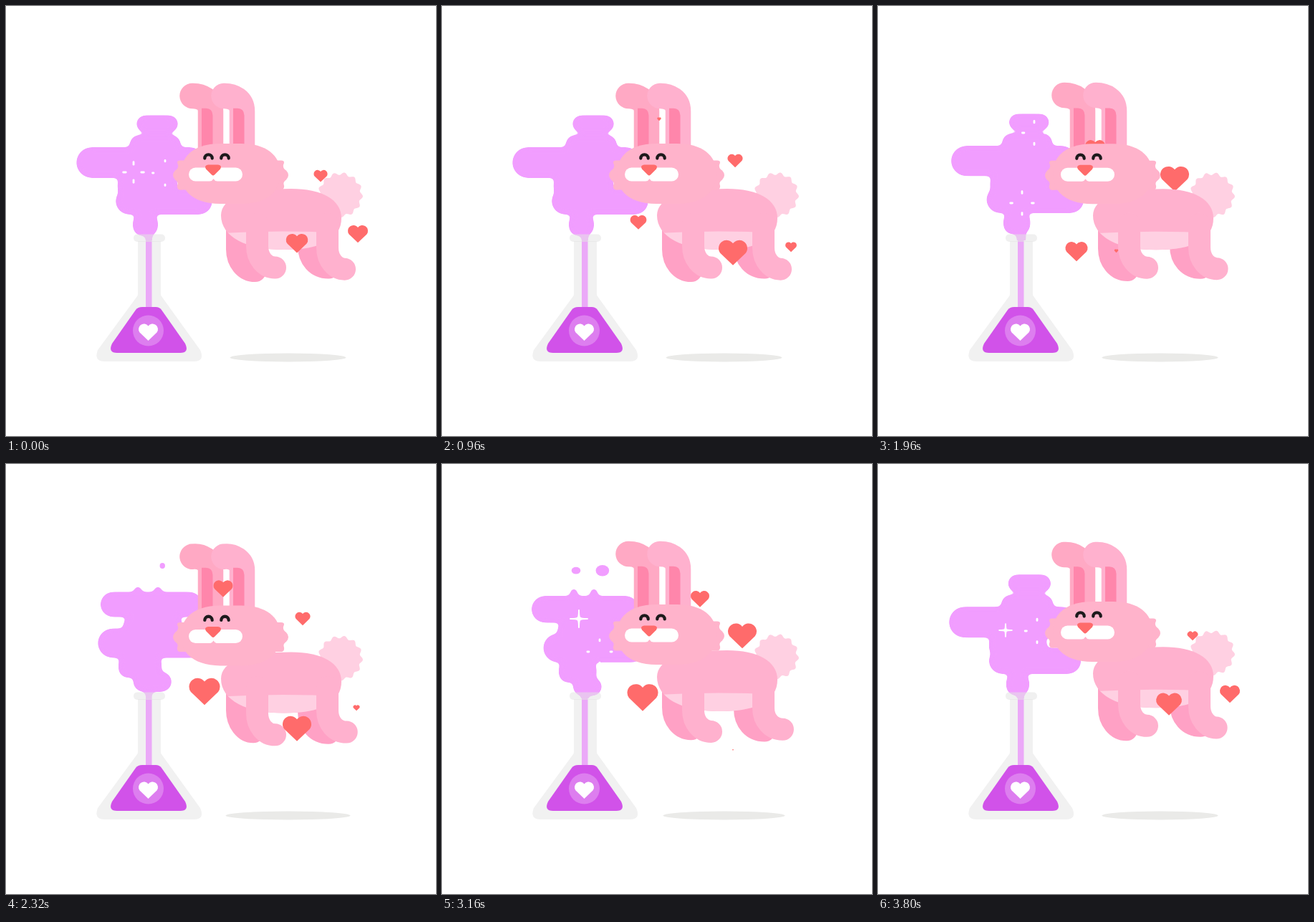
Animation, 600 px wide and 600 px high, one loop 3840 ms. Source, as an HTML page:

```html
<!DOCTYPE html>
<html lang="en">
<head>
<meta charset="utf-8">
<title>Love potion bunny</title>
<style>
  html, body { margin: 0; width: 100%; height: 100%; overflow: hidden; background: #fff; }
  svg { display: block; width: 100vw; height: 100vh; }
</style>
</head>
<body>
<svg viewBox="0 0 600 600">
  <defs>
    <filter id="goo" filterUnits="userSpaceOnUse" x="70" y="120" width="250" height="207" color-interpolation-filters="sRGB">
      <feGaussianBlur stdDeviation="3.6"/>
      <feColorMatrix values="1 0 0 0 0  0 1 0 0 0  0 0 1 0 0  0 0 0 12 -5.5"/>
    </filter>
    <path id="body" d="M300 292C300 268 335 255 398 255C440 255 468 270 468 296C468 325 440 340 388 340C335 340 300 322 300 292Z"/>
    <clipPath id="bodyClip"><use href="#body"/></clipPath>
    <path id="heart" d="M0 12L-12 .5A7.5 7.5 0 0 1 0-8.5A7.5 7.5 0 0 1 12 .5Z"/>
  </defs>
  <ellipse id="shadow" cx="393.5" cy="490.5" ry="6" fill="#eaeae8"/>
  <path fill="#f1f1f1" d="M184 328V402Q184 404 183 405L128 480Q122 496 138 496H262Q278 496 271 480L217 405Q216 404 216 402V328Z"/>
  <path fill="#eba9f8" d="M195 326H203.5V421H195Z"/>
  <path fill="#d152e9" d="M190 420H209Q214 420 217 424L250 471Q256 484 243 484H155Q142 484 148 471L181 424Q184 420 190 420Z"/>
  <circle cx="198.5" cy="453" r="21.5" fill="#fff" opacity=".25"/>
  <use href="#heart" transform="translate(198.5 455)" fill="#fff"/>
  <g id="smoke" fill="#f19dff" filter="url(#goo)"></g>
  <g id="drops" fill="#f19dff"></g>
  <rect x="178" y="318.5" width="44" height="10.5" rx="5" fill="#e3e3e3" opacity=".55"/>
  <g id="sparkles" fill="#fff" stroke="#fff" stroke-linecap="round" stroke-linejoin="round"></g>
  <g id="bunny"></g>
</svg>
<script>
const LOOP = 3840, BEAT = 960, TAU = Math.PI * 2;
const PINK = '#ffb1ce', FAR = '#ffa1c5', HEAD = '#ffb3cb', CORAL = '#ff6b6b';
const $ = id => document.getElementById(id);

// Smoke rises one stage per beat; edges are [stage, x] key points.
const BAND = {
  left: [[-2, 195], [-1, 153], [-.7, 141], [-.4, 108], [0, 98], [.35, 130], [.75, 140], [.94, 181], [1.2, 185]],
  right: [[-2, 204], [-1.4, 243], [-1, 288], [.78, 270], [.94, 242], [1.2, 234]],
  height: s => s < 0 ? 43 - 6 * s * s : 43 - 19 * s,
  round: 30
};
const TRUNK = {
  left: [[-2, 195], [-1.6, 177], [-1, 148], [0, 167], [.65, 176]],
  right: [[-2, 203], [-1.6, 212], [-.8, 222], [-.6, 239], [0, 250], [.65, 240]],
  height: s => Math.min(32 + 4 * s * (s > 0), 16 + 45 * (s + 2), 6 + 150 * (.65 - s)),
  round: 13
};

// Hearts pop up at fixed spots, rise and fade.
const LIFE = 920, GROW = 250, FADE = 300;
const BACK = [{ x: 409, y: 269, w: 40, drift: 5, births: [200, 1560, 2740] }];
const MID = [
  { x: 303, y: 218, w: 28, births: [100, 1690] },
  { x: 360, y: 233, w: 28, births: [950, 2520] }
];
const FRONT = [
  { x: 439, y: 249, w: 28, births: [3670] },
  { x: 406, y: 400, w: 40, speed: .1, births: [400, 2010, 3150] },
  { x: 487, y: 346, w: 28, drift: 2, births: [820, 2240, 3440] },
  { x: 274, y: 355, w: 43, drift: 3, births: [200, 1780, 2740] },
  { x: 332.5, y: 402, w: 28, births: [1100] }
];
// [x, y, time at which the star breaks into dashes]
const SPARKLES = [
  [191, 223, 700], [181, 210, 1250], [201, 275, 1900], [218, 177, 1890], [217, 210, 2840],
  [220, 262, 3070], [191, 216, 3260], [222, 233, 3720], [178, 232, 3820]
];

const riseY = stage => 218.5 - 54 * stage;
const box = (x, y, w, h, r) => `<rect x="${x}" y="${y}" width="${w}" height="${h}" rx="${r}"/>`;
const dot = (x, y, rx, ry = rx) => `<ellipse cx="${x}" cy="${y}" rx="${Math.max(0, rx)}" ry="${Math.max(0, ry)}"/>`;
const path = (d, attrs) => `<path d="${d}" ${attrs}/>`;

function along(keys, s) {
  const i = keys.findIndex(k => k[0] > s);
  if (i < 1) return null;
  const [s0, a] = keys[i - 1], [s1, b] = keys[i];
  return a + (b - a) * (s - s0) / (s1 - s0);
}

function puff({ left, right, height, round }, stage) {
  const x = along(left, stage);
  if (x === null) return '';
  const h = height(stage);
  return box(x, riseY(stage) - h / 2, along(right, stage) - x, h, Math.min(round, h / 2));
}

function drawSmoke(p) {
  let s = box(195, 295, 8.5, 50, 0);
  for (let k = -3; k < 2; k++) s += puff(BAND, k + p) + puff(TRUNK, k + .4 + p);
  // Strands left behind by the puff that has just torn off
  if (p > .08 && p < .55) {
    const top = 183 - 33 * p + 60 * Math.max(0, p - .4);
    for (const x of [184, 212]) s += box(x - 5, top, 10, 200 - top, 5);
  }
  if (p > .52 && p < .74) {
    const y = riseY(p) - 24.5;
    s += box(186.5, y - 5.5, 18.5, 11, 5.5) + box(192, y, 8, 20, 0);
  }
  $('smoke').innerHTML = s;

  const y = riseY(1 + p);
  $('drops').innerHTML = p < .2 ? '' :
    dot(187, y, 65 * (.39 - p), 50 * (.39 - p)) +
    dot(224 - 45 * Math.max(0, p - .29), y, 45 * (.5 - p), 30 * (.55 - p) * (p < .5)) +
    dot(200, y, 40 * (.68 - p) * (p > .5));
}

function drawSparkles(t) {
  $('sparkles').innerHTML = SPARKLES.map(([x, y, start]) => {
    const a = (t - start + LOOP * 1.5) % LOOP - LOOP / 2;
    let s = '';
    if (a > -200 && a < 0) {
      const r = a < -100 ? .12 * (a + 200) : 12 - .04 * (a + 100);
      s = path(`M0 ${-r}C0 0 0 0 ${r} 0C0 0 0 0 0 ${r}C0 0 0 0 ${-r} 0C0 0 0 0 0 ${-r}Z`, 'stroke-width="2"');
    } else if (a >= 0 && a < 150) {
      const left = 1 - a / 150, mid = 17 - 6 * left * left, half = .4 + 1.6 * left;
      for (let q = 0; q < 4; q++)
        s += path(`M${mid - half} 0h${half * 2}`, `stroke-width="2.8" transform="rotate(${q * 90})"`);
    }
    return `<g transform="translate(${x} ${y})">${s}</g>`;
  }).join('');
}

const drawHearts = (spots, t) => spots.map(({ x, y, w, speed = .07, drift = 0, births }) =>
  births.map((birth, i) => {
    const age = (t - birth + LOOP) % LOOP;
    if (age >= LIFE) return '';
    const size = w / 27 * Math.min(1, age / GROW, (LIFE - age) / FADE);
    return `<use href="#heart" fill="${CORAL}" transform="translate(${x + drift * i} ${y - speed * age}) scale(${size})"/>`;
  }).join('')).join('');

const tail = (() => {
  let d = '';
  for (let i = 0; i < 168; i++) {
    const a = i / 168 * TAU, r = 29.6 + 1.9 * Math.cos(13 * (a - .07));
    d += `${i ? 'L' : 'M'}${(466.5 + r * Math.cos(a)).toFixed(2)} ${(263.5 + r * Math.sin(a)).toFixed(2)}`;
  }
  return path(d + 'Z', 'fill="#ffd0e2"');
})();

const head = (() => {
  const tuft = 'M254 215H243Q237 215 240 221Q241 226 236 229Q230 235.5 236 242Q241 245 239 250Q238 257 246 256H260Z';
  const skin = `fill="${HEAD}"`;
  const eye = x => path(`M${x - 5.2} 212a5.2 5.2 0 0 1 10.4 0`,
    'fill="none" stroke="#1d1a1c" stroke-width="4.3" stroke-linecap="round"');
  return path(tuft, skin) + path(tuft, skin + ' transform="matrix(-1 0 0 1 627 0)"') +
    path('M299 191.5H328C362 191.5 383 207 383 233.5C383 260 362 275.5 328 275.5H299C265 275.5 244 260 244 233.5C244 207 265 191.5 299 191.5Z', skin) +
    '<rect x="255" y="225" width="75" height="19" rx="9.5" fill="#fff"/>' +
    path('M284 244.5Q288 243.5 289.5 240.5Q291 243.5 295 244.5Z', skin) +
    path('M282 221H296Q302 222 299 227L291 235Q289 237 287 235L279 227Q276 222 282 221Z', `fill="${CORAL}"`) +
    eye(282.5) + eye(305.5);
})();

function drawBunny(t) {
  const wave = peak => Math.cos(TAU * (t - peak) / BEAT);
  const bob = 4 * (1 + wave(480)), nod = .5 + 2.8 * (1 + wave(455)), flop = wave(620);
  const lift = (y, s) => `<g transform="translate(0 ${y})">${s}</g>`;

  const leg = (x, footX, footY, color) => path(
    `M${x} ${304 + bob}V${footY - 30}C${x} ${footY - 13} ${x + 11} ${footY} ${footX} ${footY}`,
    `fill="none" stroke="${color}" stroke-width="31" stroke-linecap="round"`);

  const ear = (x, color) => {
    const tip = 128.5 + 5 * flop, top = 144.3 + 2.4 * flop;
    return path(`M${x - 25.5} ${tip}C${x - 13} ${tip - 1.5 - 2 * flop} ${x} ${tip + 6} ${x} ${148 + 2 * flop}V${210 + nod}`,
        `fill="none" stroke="${color}" stroke-width="35.5" stroke-linecap="round"`) +
      path(`M${x - 12.5} ${top}h6q9 0 9.5 10V${205 + nod}h-15.5Z`, 'fill="#ff86ab"');
  };

  $('bunny').innerHTML =
    drawHearts(BACK, t) +
    lift(bob, tail) +
    leg(322.5, 345.5 - 3.5 * flop, 373 + 5.5 * flop, FAR) +
    leg(422.5, 450, 370.5 + 5.5 * wave(480), FAR) +
    lift(bob, `<use href="#body" fill="${PINK}"/>` +
      path('M300 317Q387 312 470 317V345H300Z', 'fill="#ffd0e2" clip-path="url(#bodyClip)"')) +
    leg(350.5, 375.5, 372 + 7 * wave(490), PINK) +
    leg(448.5, 473.5 + 2 * wave(320), 371.5 + 5 * wave(560), PINK) +
    ear(285.5, '#ffa9c4') + ear(329.5, PINK) +
    drawHearts(MID, t) +
    lift(nod, head) +
    drawHearts(FRONT, t);
  $('shadow').setAttribute('rx', 81 + .81 * bob);
}

function draw() {
  const t = performance.now() % LOOP;
  drawSmoke(t % BEAT / BEAT);
  drawSparkles(t);
  drawBunny(t);
  requestAnimationFrame(draw);
}
draw();
</script>
</body>
</html>
```
